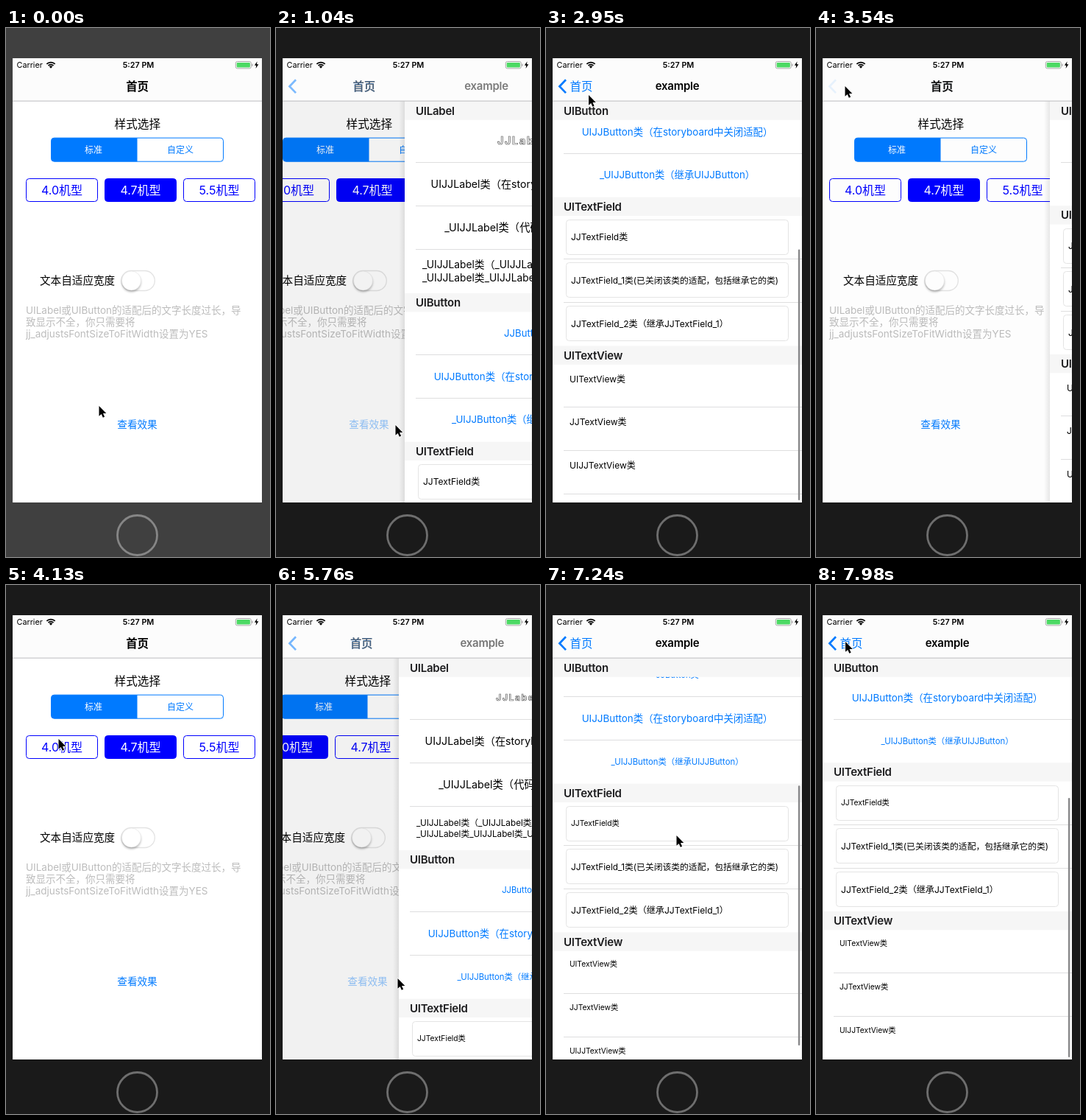
An HTML page that plays this animation: 359x718 px, repeating every 8 s.

```html
<!DOCTYPE html>
<html lang="zh-CN">
<head>
<meta charset="utf-8">
<title>首页</title>
<style>
html, body { margin: 0; width: 100%; height: 100%; overflow: hidden; background: #1a1a1a; }
svg { display: block; width: 359px; height: 718px; font-family: Inter, "Noto Sans CJK SC", "Noto Sans CJK", sans-serif; }
.b { font-weight: 600; letter-spacing: -.25px; }
.outline { font-weight: 700; fill: #fff; stroke: #555; stroke-width: .7px; }
</style>
</head>
<body>
<svg id="stage" viewBox="0 0 359 718">
  <defs>
    <clipPath id="screenClip"><rect x="9" y="41" width="339" height="603"/></clipPath>
    <clipPath id="bodyClip"><rect x="9" y="99" width="339" height="545"/></clipPath>
    <linearGradient id="edge"><stop stop-color="#000" stop-opacity="0"/><stop offset="1" stop-color="#000" stop-opacity=".09"/></linearGradient>
    <filter id="soft" x="-50%" y="-50%" width="200%" height="200%"><feGaussianBlur stdDeviation="1.6"/></filter>
  </defs>
  <rect id="bezel" width="359" height="718"/>
  <circle id="homeKey" cx="178.5" cy="688.5" r="27" fill="none" stroke-width="2.8"/>
  <g clip-path="url(#screenClip)">
    <rect x="9" y="41" width="339" height="604" fill="#fff"/>
    <g clip-path="url(#bodyClip)">
      <g id="home"></g>
      <rect id="dim" x="9" y="99" width="339" height="546"/>
      <g id="page">
        <rect id="shade" x="1" y="99" width="8" height="546" fill="url(#edge)"/>
        <rect x="9" y="99" width="339" height="546" fill="#fff"/>
        <g id="lists"></g>
        <rect id="bar" x="342.9" width="2.5" rx="1.2" fill="#8a8a8c"/>
      </g>
    </g>
    <rect x="9" y="41" width="339" height="58" fill="#fcfcfc"/>
    <rect x="9" y="98.6" width="339" height="1" fill="#bcbcbe"/>
    <g id="nav"></g>
    <g id="status"></g>
  </g>
  <path id="cursor" d="M0 0V13.8L3.2 10.9L5.3 15.8L7.6 14.8L5.5 10H9.8Z" fill="#000" stroke="#fff" stroke-width="1.6" stroke-linejoin="round" paint-order="stroke"/>
</svg>
<script>
const LOOP = 8000, STEP = 147.7;
const TOP = 99.4, ROW = 58.8, HEAD = 25.35, MAX = 320.5, WIDTH = 339;
const BLUE = '#007aff', PURE = '#0000ff';
const $ = id => document.getElementById(id);

function add(parent, tag, attrs) {
  const el = document.createElementNS('http://www.w3.org/2000/svg', tag);
  for (const k in attrs) el.setAttribute(k, attrs[k]);
  parent.appendChild(el);
  return el;
}
const rect = (g, x, y, width, height, more) => add(g, 'rect', { x, y, width, height, ...more });

// Text whose optical middle sits at cy
function text(g, str, x, cy, size, more) {
  const el = add(g, 'text', { x, y: cy + size * .36, 'font-size': size, fill: '#000', ...more });
  el.textContent = str;
  return el;
}
const mid = (g, str, x, cy, size, more) => text(g, str, x, cy, size, { 'text-anchor': 'middle', ...more });

// ---- status bar ----
const status = $('status');
text(status, 'Carrier', 14.5, 50.2, 10.8);
mid(status, '5:27 PM', 180, 50.2, 10.8, { 'font-weight': 600 });
for (const r of [8, 4.9]) {
  const d = r * .707;
  add(status, 'path', { d: `M${61 - d} ${54.6 - d}A${r} ${r} 0 0 1 ${61 + d} ${54.6 - d}`, fill: 'none', stroke: '#000', 'stroke-width': 1.9 });
}
add(status, 'path', { d: 'M61 54.8L58.8 52.4A3 3 0 0 1 63.2 52.4Z' });
rect(status, 312.3, 45.5, 21, 9.4, { rx: 2.2, fill: '#fff', stroke: '#a8a8a8' });
rect(status, 313.7, 46.9, 18.2, 6.6, { rx: 1, fill: '#4cd964' });
rect(status, 334.4, 48.5, 1.3, 3.4, { rx: .6, fill: '#a8a8a8' });
add(status, 'path', { d: 'M341.6 45.2L337.9 50.8H340.3L339.6 55L343.4 49.2H340.9Z' });

// ---- navigation bar ----
const nav = $('nav');
const chevron = add(nav, 'path', { d: 'M27 70.3L18.4 79.2L27 88.1', fill: 'none', stroke: BLUE, 'stroke-width': 2.7 });
const backTitle = mid(nav, '首页', 0, 79, 15.4, { fill: BLUE });
const homeTitle = mid(nav, '首页', 0, 79, 15.4, { class: 'b' });
const pageTitle = mid(nav, 'example', 0, 79, 15, { class: 'b' });

// ---- home page ----
const home = $('home');
mid(home, '样式选择', 178.8, 130.5, 15.6);
rect(home, 61.5, 149.2, 234, 32, { rx: 4, fill: '#fff', stroke: BLUE });
add(home, 'path', { d: 'M178.5 149.2V181.2H65.5A4 4 0 0 1 61.5 177.2V153.2A4 4 0 0 1 65.5 149.2Z', fill: BLUE });
mid(home, '标准', 119, 165.2, 12, { fill: '#fff' });
mid(home, '自定义', 237, 165.2, 12, { fill: BLUE });
const models = ['4.0', '4.7', '5.5'].map((name, i) => {
  const x = 27.5 + i * 107;
  return {
    box: rect(home, x, 204.5, 97, 31, { rx: 4, stroke: PURE }),
    label: mid(home, name + '机型', x + 48.5, 220, 16)
  };
});
text(home, '文本自适应宽度', 46, 343, 14.6);
rect(home, 156.7, 329.5, 45.6, 27, { rx: 13.5, fill: '#fff', stroke: '#e3e3e3', 'stroke-width': 1.3 });
add(home, 'circle', { cx: 170.5, cy: 345.2, r: 13, fill: '#000', opacity: .28, filter: 'url(#soft)' });
add(home, 'circle', { cx: 170.5, cy: 343, r: 13, fill: '#fff', stroke: '#dedede', 'stroke-width': .5 });
['UILabel或UIButton的适配后的文字长度过长，导', '致显示不全，你只需要将', 'jj_adjustsFontSizeToFitWidth设置为YES']
  .forEach((s, i) => text(home, s, 27, 383.5 + i * 16, 13.5, { fill: '#bcbcbc' }));
const showBtn = mid(home, '查看效果', 178.5, 538, 13.6, { fill: BLUE });

// ---- example list, with adapted texts scaled by k ----
function buildList(k) {
  const g = add($('lists'), 'g', {}), rows = add(g, 'g', {}), heads = [];
  let y = TOP;
  const section = (name, items) => {
    heads.push({ name, y });
    y += HEAD;
    items.forEach((draw, i) => {
      draw(y);
      y += ROW;
      if (i < items.length - 1 || name === 'UITextView') {
        rect(rows, 24, Math.round(y - 1.12), 324, 1, { fill: '#dededf' });
      }
    });
  };
  const centred = (s, size, fill) => top => mid(rows, s, 178.5, top + 28.6, size, { fill });
  const field = (s, size) => top => {
    rect(rows, 27.5, Math.floor(top + 5) + .5, 302, 47, { rx: 4, fill: '#fff', stroke: '#e4e4e4' });
    text(rows, s, 34, top + 28.5, size);
  };
  const view = s => top => text(rows, s, 32, top + 7.4 + 12 * k, 12 * k);
  const pair = top => ['_UIJJLabel类（_UIJJLabel类_UIJJLabel类', '_UIJJLabel类_UIJJLabel类_UIJJLabel类']
    .forEach((s, i) => text(rows, s, 33, top + 28.8 + (i - .5) * 17.5 * k, 13.8 * k));

  section('UILabel', [
    top => mid(rows, 'JJLabel 类', 178.8, top + 28.3, 14.2 * k, { class: 'outline', 'letter-spacing': 1.8 * k }),
    centred('UIJJLabel类（在storyboard中关闭适配）', 14.2, '#000'),
    centred('_UIJJLabel类（代码手动关闭适配）', 14.3, '#000'),
    pair
  ]);
  section('UIButton', [
    centred('JJButton类', 13.2 * k, BLUE),
    centred('UIJJButton类（在storyboard中关闭适配）', 13.4, BLUE),
    centred('_UIJJButton类（继承UIJJButton）', 13.3 * k, BLUE)
  ]);
  section('UITextField', [
    field('JJTextField类', 12 * k),
    field('JJTextField_1类(已关闭该类的适配，包括继承它的类)', 11.8),
    field('JJTextField_2类（继承JJTextField_1）', 12.1)
  ]);
  section('UITextView', ['UITextView类', 'JJTextView类', 'UIJJTextView类'].map(view));

  heads.forEach(h => {
    h.g = add(g, 'g', {});
    rect(h.g, 9, 0, WIDTH, HEAD, { fill: '#f6f6f6' });
    text(h.g, h.name, 24, 12.9, 15, { class: 'b', fill: '#1c1c1e' });
  });
  return { g, rows, heads };
}
const lists = [buildList(1), buildList(320 / 375)];

function scrollList(list, s) {
  list.rows.setAttribute('transform', `translate(0 ${-Math.floor(s)})`);
  list.heads.forEach((h, i) => {
    const next = list.heads[i + 1];
    let y = Math.max(h.y - s, TOP);
    if (next) y = Math.min(y, next.y - s - HEAD);
    h.g.setAttribute('transform', `translate(0 ${y})`);
  });
}

// ---- motion ----
const clamp = v => Math.max(0, Math.min(1, v));
const smooth = u => u * u * (3 - 2 * u);
const glide = (t, from) => 1 - Math.pow(1 - clamp((t - from) / 500), 3.42);

function track(keys, t, ease = u => u) {
  let i = 0;
  while (i < keys.length - 2 && t >= keys[i + 1][0]) i++;
  const a = keys[i], b = keys[i + 1], u = ease(clamp((t - a[0]) / (b[0] - a[0])));
  return a.slice(1).map((v, j) => v + (b[j + 1] - v) * u);
}

const pointer = [
  [20, 127, 513], [591, 163, 539], [1400, 163, 539], [2070, 131, 378], [2215, 132, 374],
  [2660, 136, 236], [2954, 58.5, 91], [3100, 41, 79], [3540, 40, 79], [4135, 72, 209],
  [4283, 73, 223], [4431, 74, 225], [4720, 74, 225], [5317, 166, 534], [5900, 166, 534],
  [6646, 176, 470], [6942, 176, 468], [7237, 178, 340], [7400, 178, 332], [7976, 40.5, 77]
];
const firstScroll = [[2216, 0], [2363, 60], [2511, 190], [2659, 300], [2806, 345], [2954, 332], [3102, 322], [3249, MAX]];
const nextScroll = [[6795, 0], [6942, 35], [7090, 165], [7237, 292], [7385, 338], [7533, 332], [7680, 323], [7828, MAX]];

function render(t) {
  const second = t >= 4715, awake = t >= 885;
  const p = t < 3290 ? glide(t, 940) : t < 5000 ? 1 - glide(t, 3290) : glide(t, 5660);
  const s = track(second ? nextScroll : firstScroll, t)[0];

  $('bezel').setAttribute('fill', awake ? '#1a1a1a' : '#404040');
  $('homeKey').setAttribute('stroke', awake ? '#6e6e6e' : '#868686');

  models.forEach((m, i) => {
    const on = i === (second ? 0 : 1);
    m.box.setAttribute('fill', on ? PURE : '#fff');
    m.label.setAttribute('fill', on ? '#fff' : PURE);
  });
  const pressed = (t >= 885 && t < 2500) || t >= 5605;
  showBtn.setAttribute('opacity', pressed ? .42 : 1);

  home.setAttribute('transform', `translate(${Math.round(-.3 * WIDTH * p)} 0)`);
  $('dim').setAttribute('opacity', .1 * p);
  $('page').setAttribute('transform', `translate(${Math.round(WIDTH * (1 - p))} 0)`);
  $('page').setAttribute('display', p > 0 ? 'inline' : 'none');

  const x = 178.5 - 130.5 * Math.pow(p, 1.18);
  homeTitle.setAttribute('x', x);
  homeTitle.setAttribute('opacity', 1 - p);
  backTitle.setAttribute('x', x);
  backTitle.setAttribute('opacity', p);
  chevron.setAttribute('opacity', p);
  pageTitle.setAttribute('x', 178.5 + 219 * (1 - p));
  pageTitle.setAttribute('opacity', p);

  lists.forEach((l, i) => l.g.setAttribute('display', i === +second ? 'inline' : 'none'));
  scrollList(lists[+second], s);

  const part = Math.min(s, MAX) / MAX;
  $('bar').setAttribute('y', 101 + 188 * part + Math.max(0, s - MAX));
  $('bar').setAttribute('height', 360 - 8 * part - Math.max(0, s - MAX));
  $('bar').setAttribute('opacity', second ? +(t >= 6935) : t < 2060 ? 0 : 1 - clamp((t - 3250) / 300));

  const [cx, cy] = track(pointer, t, smooth);
  $('cursor').setAttribute('transform', `translate(${cx - .5} ${cy})`);
}

function tick() {
  const t = performance.now() % LOOP;
  render(Math.floor((t + 6) / STEP) * STEP);
  requestAnimationFrame(tick);
}
tick();
</script>
</body>
</html>
```
